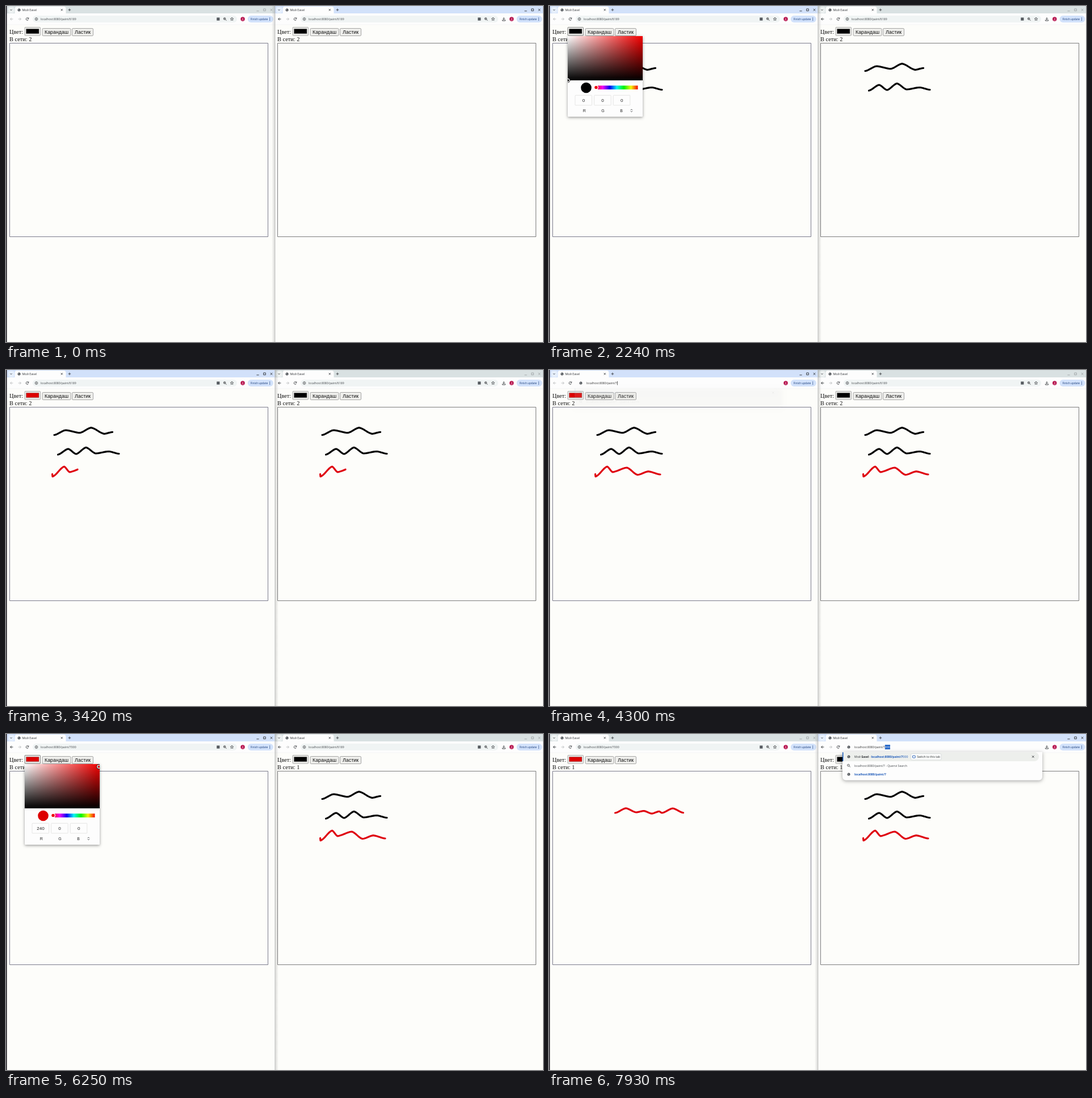
Recreate the animation shown at these times as an HTML page with a canvas. Size 946 px wide and 592 px high, loop 8000 ms.

```html
<!DOCTYPE html>
<html lang="ru">
<head>
<meta charset="utf-8">
<style>
html, body { margin: 0; width: 946px; height: 592px; overflow: hidden; background: #fdfdfa; }
canvas { display: block; }
</style>
</head>
<body>
<canvas id="stage" width="946" height="592"></canvas>
<script>
const LOOP = 8000;
const ctx = document.getElementById('stage').getContext('2d');
const UI = '"Open Sans", sans-serif', SANS = '"Liberation Sans", Arial, sans-serif';
const SERIF = '"Liberation Serif", Times, serif';
const SMALL = '5.17px ' + UI, BOLD = 'bold 5.02px ' + UI;
const DARK = '#2c2f33', BLUE = '#1b58b8', NAVY = '#173a78', RED = '#df0410';
const TITLE = 'Мой Easel', HOST = 'localhost:8080/paint/';

// ---- helpers -------------------------------------------------------------
const clamp = (x, a = 0, b = 1) => Math.max(a, Math.min(b, x));
const progress = (t, a, b) => clamp((t - a) / (b - a));
const ease = p => p * p * (3 - 2 * p);
const mix = (a, b, p) => a.map((v, i) => v + (b[i] - v) * p);

function rect(x, y, w, h, fill, r = 0, stroke, lw = 0.7) {
  ctx.beginPath();
  ctx.roundRect(x, y, w, h, r);
  if (fill) { ctx.fillStyle = fill; ctx.fill(); }
  if (stroke) { ctx.strokeStyle = stroke; ctx.lineWidth = lw; ctx.stroke(); }
}
function circle(x, y, r, fill, stroke, lw = 0.8) {
  rect(x - r, y - r, 2 * r, 2 * r, fill, r, stroke, lw);
}
function text(s, x, y, font, color = DARK, align = 'left') {
  ctx.font = font;
  ctx.fillStyle = color;
  ctx.textAlign = align;
  ctx.fillText(s, x, y);
  return x + ctx.measureText(s).width;
}
function line(color, lw, points) {
  ctx.strokeStyle = color;
  ctx.lineWidth = lw;
  ctx.beginPath();
  points.forEach(([x, y]) => ctx.lineTo(x, y));
  ctx.stroke();
}
function gradient(x0, y0, x1, y1, ...colors) {
  const g = ctx.createLinearGradient(x0, y0, x1, y1);
  colors.forEach((c, i) => g.addColorStop(i / (colors.length - 1), c));
  return g;
}
function card(x, y, w, h, r, blur, alpha) {
  ctx.save();
  ctx.shadowColor = `rgba(0,0,0,${alpha})`;
  ctx.shadowBlur = blur;
  ctx.shadowOffsetY = 1.5;
  rect(x, y, w, h, '#fdfdfd', r);
  ctx.restore();
}

// ---- hand-drawn waves: eased from each crest to the next trough ----------
const crests = (...peaks) => peaks;
const strokes = [
  { color: '#050505', from: 500, to: 1170, shared: true,
    peaks: crests([85, 114.5], [105, 106], [130, 110.7], [150, 101.6], [173, 112.4], [187.5, 109.4]) },
  { color: '#050505', from: 1420, to: 1740, shared: true,
    peaks: crests([91.5, 149], [109.5, 139], [123.5, 148], [141, 136.5], [158, 147], [181, 143.5], [199, 147.5]) },
  { color: RED, from: 3060, to: 3960, shared: true,
    peaks: crests([81.5, 183.5], [82, 187.7], [102.5, 170.2], [112, 179.8], [137, 172], [156, 184.7], [175, 178.7], [196, 184]) },
  { color: RED, from: 6640, to: 7280,
    peaks: crests([116.5, 139], [135.5, 130.8], [153.5, 138], [167, 135.5], [181, 140.2], [194, 136.4], [199, 139], [218, 131], [236.5, 138.7]) }
];
function drawStroke({ color, from, to, peaks }, t) {
  const done = progress(t, from, to), start = peaks[0][0], end = peaks.at(-1)[0];
  if (!done) return;
  const tip = start + (end - start) * done, points = [];
  for (let i = 1; i < peaks.length; i++) {
    const [x0, y0] = peaks[i - 1], [x1, y1] = peaks[i];
    for (let p = 0; p <= 1; p += 1 / 16) {
      const x = x0 + (x1 - x0) * p;
      if (x <= tip) points.push([x, y0 + (y1 - y0) * (0.65 * ease(p) + 0.35 * p)]);
    }
  }
  ctx.lineCap = ctx.lineJoin = 'round';
  line(color, 3.2, points);
  ctx.lineCap = 'butt';
}

// ---- icons ---------------------------------------------------------------
function cross(x, y, r, color = DARK) {
  for (const s of [-1, 1]) line(color, 0.9, [[x - r, y - r * s], [x + r, y + r * s]]);
}
function plus(x, y, r, lw) {
  line(DARK, lw, [[x - r, y], [x + r, y]]);
  line(DARK, lw, [[x, y - r], [x, y + r]]);
}
function chevron(x, y, r, dir = 1) {
  line(DARK, 0.9, [[x - r, y - r * dir], [x, y], [x + r, y - r * dir]]);
}
function arrow(x, y, dir, color) {
  line(color, 0.9, [[x - 2.4, y], [x + 2.4, y]]);
  line(color, 0.9, [[x + dir * 0.2, y - 2.3], [x + dir * 2.4, y], [x + dir * 0.2, y + 2.3]]);
}
function globe(x, y) {
  circle(x, y, 2.5, '#4d5156');
  line('#eef1f3', 0.6, [[x - 1.6, y - 1], [x, y - 0.4], [x + 0.2, y + 1.6]]);
}
function lens(x, y) {
  circle(x - 0.6, y - 0.6, 1.8, null, DARK);
  line(DARK, 0.9, [[x + 0.8, y + 0.8], [x + 2.7, y + 2.7]]);
}
function star(x, y) {
  line(DARK, 0.7, Array.from({ length: 11 }, (_, i) => {
    const a = i * Math.PI / 5, r = i % 2 ? 1.3 : 2.9;
    return [x + r * Math.sin(a), y - r * Math.cos(a)];
  }));
}
function reload(x, y) {
  ctx.beginPath();
  ctx.arc(x, y, 2.2, 0.5, 5.4);
  ctx.strokeStyle = DARK;
  ctx.lineWidth = 0.9;
  ctx.stroke();
  line(DARK, 0.9, [[x + 2.3, y - 2.6], [x + 2.3, y - 0.7], [x + 0.5, y - 0.7]]);
}
function download(x, y) {
  line(DARK, 0.9, [[x, y - 3], [x, y + 1.2]]);
  chevron(x, y + 1.3, 1.8);
  line(DARK, 0.9, [[x - 2.6, y + 1.4], [x - 2.6, y + 3], [x + 2.6, y + 3], [x + 2.6, y + 1.4]]);
}

// ---- browser window (local coordinates) ----------------------------------
function chrome(w) {
  const ink = w.active ? DARK : '#9fa4a6';
  rect(1.5, 0, 472.5, 14, w.active ? '#d2e1fa' : '#d9e1e2');
  rect(4, 1.5, 10.5, 11, w.active ? '#e6effc' : '#edf1f1', 3.5);
  chevron(9, 7.7, 1.5);
  rect(15.5, 1, 90, 14, '#fdfdfd', [4, 4, 0, 0]);
  rect(1.5, 13, 472.5, 20, '#fdfdfd');
  rect(1.5, 32.7, 472.5, 0.6, '#e9ebea');
  globe(23, 7);
  text(TITLE, 28.5, 9, '5.3px ' + UI);
  cross(98.3, 6.8, 1.5);
  plus(111.9, 6.8, 2.3, 0.8);
  rect(441.4, 8.4, 4.2, 0.9, ink);
  rect(453.7, 5, 3.6, 3.6, null, 0, ink, 0.9);
  cross(467.5, 6.8, 1.8, ink);

  arrow(10, 23, -1, w.back ? DARK : '#b9bcbd');
  arrow(24, 23, 1, '#b9bcbd');
  reload(37.5, 23);
  if (!w.editing) {
    const end = w.downloads ? 395 : 407;
    rect(47, 17, end - 47, 12, '#f0f4f4', 6);
    circle(53.5, 23, 2.3, null, DARK, 0.7);
    rect(53.1, 22.6, 0.8, 1.8, DARK);
    rect(53.1, 21.3, 0.8, 0.8, DARK);
    text(HOST + w.room, 61, 24.9, SMALL, '#44484c');
    rect(end - 35.8, 20.4, 5.2, 5.2, '#565b60');
    lens(end - 21.3, 23);
    plus(end - 21.9, 22.4, 0.9, 0.6);
    star(end - 9, 23);
  }
  if (w.downloads) download(405, 23);
  const avatar = w.downloads ? 418.7 : 417, pill = avatar + 8.8;
  circle(avatar, 23, 3.7, '#b5104c');
  text('Д', avatar, 24.6, '4.4px ' + UI, '#f6d5e0', 'center');
  rect(pill, 17, 45, 12, '#d2e2fb', 6);
  text('Finish update', pill + 4.9, 24.8, '4.85px ' + UI, NAVY);
  for (const dy of [-2.2, 0, 2.2]) circle(pill + 38.9, 23 + dy, 0.65, NAVY);
}

function button(label, x, width) {
  rect(x, 39.5, width, 13, '#efefec', 1.6, '#858585');
  text(label, x + width / 2, 49, '8.85px ' + SANS, '#111', 'center');
}

function page(w) {
  text('Цвет:', 6, 49, '10.3px ' + SERIF, '#111');
  rect(33, 37.5, 27.5, 14.5, '#efefec', 1, w.picker ? '#555' : '#8c8c8c');
  rect(35.5, 40.3, 22.5, 8.4, w.color, 0, '#777', 0.5);
  button('Карандаш', 64, 50);
  button('Ластик', 116.5, 37);
  text('В сети: ' + w.online, 6, 62.2, '10.3px ' + SERIF, '#111');
  rect(6.5, 65.5, 455, 341, null, 0, w.downloads ? '#6e6e70' : '#6c6c80', 0.9);
}

// ---- colour picker -------------------------------------------------------
function picker(rgb, shown) {
  card(33, 53, 132, 142, 1, 5, 0.4);
  rect(33, 53, 132, 78, gradient(33, 0, 165, 0, '#fff', '#f20000'));
  rect(33, 53, 132, 78, gradient(0, 53, 0, 131, 'rgba(0,0,0,0)', '#000'));

  const max = Math.max(...rgb), sat = max ? 1 - Math.min(...rgb) / max : 0;
  ctx.save();
  ctx.beginPath();
  ctx.rect(33, 53, 132, 142);
  ctx.clip();
  const x = 33 + sat * 130.5, y = 53 + (1 - max / 255) * 78;
  circle(x, y, 3.3, shown, '#111', 2);
  circle(x, y, 2.8, null, '#fff', 1.2);
  ctx.restore();

  circle(65.5, 144, 9.3, shown);
  const hues = Array.from({ length: 7 }, (_, i) => `hsl(${360 - i * 60} 100% 48%)`);
  rect(82, 140.3, 74.5, 6.6, gradient(82, 0, 157, 0, ...hues));
  circle(83, 143.6, 3.4, '#ee0000', '#fff', 1.3);

  rgb.forEach((v, i) => {
    const left = 46 + i * 33.6;
    rect(left, 157.3, 29.6, 17.6, '#fdfdfd', 1, '#dcdcda');
    text(Math.round(v), left + 15, 168.9, '8.1px ' + SANS, '#222', 'center');
    text('RGB'[i], 62.2 + i * 32.7, 186.8, '7px ' + SANS, '#222', 'center');
  });
  chevron(145.4, 181.9, 1.5, -1);
  chevron(145.4, 186.7, 1.5);
}

// ---- address bar while editing -------------------------------------------
function addressBar(typed, picked) {
  globe(56, 23);
  const x = text(typed, 66, 24.9, SMALL, '#333');
  if (picked) {
    ctx.font = SMALL;
    rect(x, 19, ctx.measureText(picked).width + 0.3, 8, '#1a5fc4');
    text(picked, x, 24.9, SMALL, '#fff');
  } else {
    rect(x + 0.3, 19.8, 0.7, 6.6, '#222');
  }
}

function suggestions(width, typed, withTab, alpha) {
  if (alpha <= 0) return;
  ctx.save();
  ctx.globalAlpha = alpha;
  card(45, 31.5, width, withTab ? 50 : 35, [0, 0, 6, 6], 6, 0.35);
  rect(45, 32, width - 6, 16, '#edefec', [0, 8, 8, 0]);
  rect(45, 32, 1.5, 16, '#1b5fc0', 1);
  globe(56, 40);
  if (withTab) {
    let x = text(TITLE.slice(0, 4), 66, 41.8, SMALL);
    x = text(TITLE.slice(4), x, 41.8, BOLD);
    x = text(' - ', x, 41.8, SMALL);
    x = text(typed, x, 41.8, BOLD, BLUE);
    text('000', x, 41.8, SMALL, BLUE);
    rect(165.5, 34.5, 53.5, 11.3, '#fafbfa', 2, '#cfd3d6');
    rect(168.5, 38.2, 4.8, 3.8, null, 0.8, BLUE, 0.9);
    text('Switch to this tab', 176.3, 41.8, '5.1px ' + UI);
    globe(56, 71);
    text(typed, 66, 72.8, BOLD, BLUE);
  } else {
    text(typed, 66, 41.8, BOLD, BLUE);
  }
  cross(width + 28.7, 40, 1.7);
  lens(56, 55.7);
  text(typed + ' - Quenvi Search', 66, 57.5, SMALL, '#44484c');
  ctx.restore();
}

// ---- timeline ------------------------------------------------------------
const LOAD = 4950;
const BLACK = [0, 0, 0], MAROON = [174, 25, 25], FULL = [240, 0, 0];

function pickedColor(t) {
  if (t < 2600) return mix(BLACK, MAROON, ease(progress(t, 2400, 2600)));
  if (t < LOAD) return mix(MAROON, FULL, ease(progress(t, 2640, 2880)));
  return mix(BLACK, FULL, ease(progress(t, 5920, 6220)));
}

function draw(t) {
  const within = (a, b) => t >= a && t < b;
  const leftActive = within(270, 7460), loaded = t >= LOAD;
  const leftEdit = within(4240, LOAD), rightEdit = t >= 7550;
  const picking = within(2240, 2910) || within(5510, 6320);
  const rgb = pickedColor(t);
  const color = `rgb(${rgb.map((v, i) => Math.round(v * (i ? 0.5 : 0.92))).join()})`;
  const online = loaded ? 1 : 2;
  const left = { active: leftActive, back: loaded, room: loaded ? '7000' : '6189',
    editing: leftEdit, color, picker: picking, online };
  const right = { active: !leftActive, back: true, room: '6189',
    editing: rightEdit, color: '#000', downloads: true, online };

  rect(0, 0, 946, 592, '#fdfdfa');
  chrome(left);
  page(left);
  strokes.filter(s => !s.shared || !loaded).forEach(s => drawStroke(s, t));
  if (leftEdit) {
    const typed = HOST + '7000'.slice(0, 1 + Math.floor(progress(t, 4270, 4720) * 3));
    suggestions(366, typed, false, 0.95 * progress(t, 4295, 4390) * (1 - progress(t, 4820, 4900)));
    t < 4270 ? addressBar('', HOST + '6189') : addressBar(typed, '');
  }
  if (picking) picker(rgb, color);
  rect(0, 0, 1.5, 592, '#17141c');

  ctx.save();
  ctx.translate(472, 0);
  chrome(right);
  page(right);
  strokes.filter(s => s.shared).forEach(s => drawStroke(s, t));
  if (rightEdit) {
    suggestions(352, HOST + '7', true, progress(t, 7830, 7910));
    t < 7840 ? addressBar('', HOST + '6189') : addressBar(HOST + '7', '000');
  }
  ctx.restore();

  // The active window casts its shadow onto the other one.
  const far = leftActive ? 480 : 468;
  rect(Math.min(far, 474), 0, 6, 592, gradient(474, 0, far, 0, 'rgba(0,0,0,.15)', 'rgba(0,0,0,0)'));
  rect(473.5, 0, 0.8, 592, '#b4b6b5');
}

function tick() {
  draw(performance.now() % LOOP);
  requestAnimationFrame(tick);
}
tick();
</script>
</body>
</html>
```
